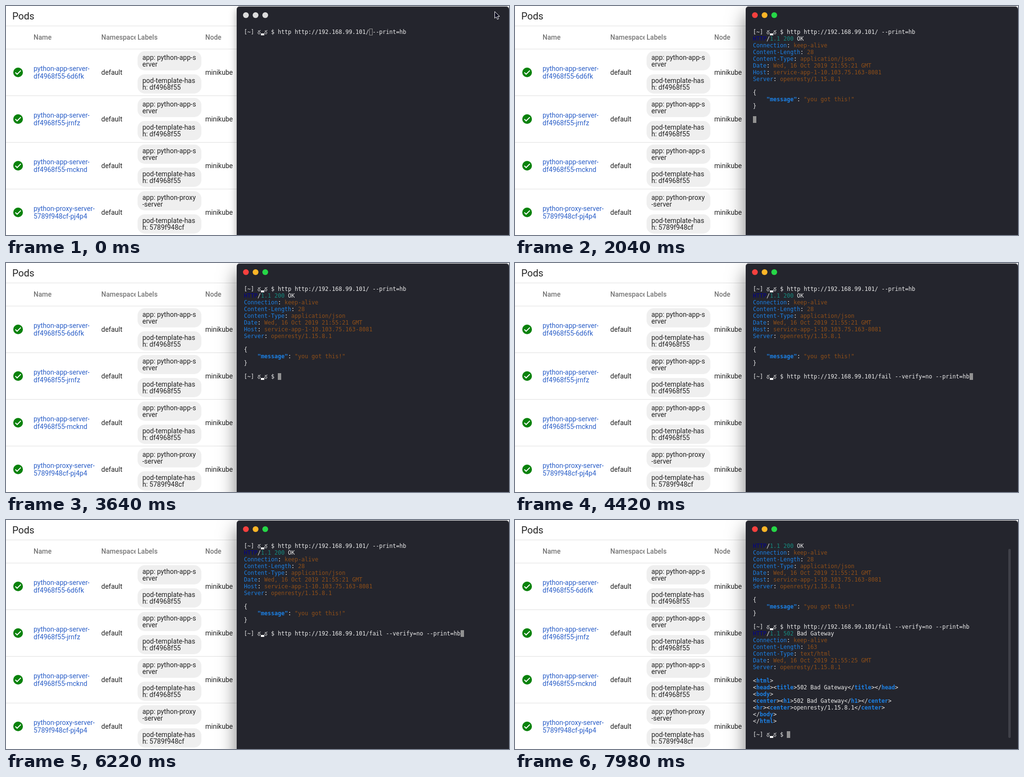
Write an HTML page that moves like this. It is 1040 px wide and 476 px high and loops after 8000 ms.

```html
<!DOCTYPE html>
<html lang="en">
<head>
<meta charset="utf-8">
<title>Pods and terminal</title>
<style>
  html, body { margin: 0; width: 100%; height: 100%; overflow: hidden; background: #fff; }
  #stage { position: relative; width: 1040px; height: 476px; overflow: hidden;
    font: 14px/16px Roboto, sans-serif; color: #212121; }
  #stage div, #stage svg.abs { position: absolute; white-space: pre; }
  .title { left: 13px; top: 9px; font-size: 20px; line-height: 24px; }
  .head { top: 57px; font-weight: 500; color: #757575; overflow: hidden; }
  .rule { left: 0; width: 480px; height: 1px; background: #e0e0e0; }
  .name { left: 57px; color: #2b5fc8; }
  .chip { left: 272px; width: 122px; height: 34px; padding: 6px 0 0 10px;
    border-radius: 15px; background: #efefef; line-height: 14px; }
  #window { left: 477px; top: 1px; width: 563px; height: 520px; border-radius: 6px; background: #24252d;
    box-shadow: 0 6px 16px rgba(0,0,0,.35), inset 0 1px #44454c; }
  #window.active { box-shadow: 0 16px 38px rgba(0,0,0,.52), inset 0 1px #44454c; }
  .light { top: 12px; width: 12px; height: 12px; border-radius: 50%; background: #dcdcdc; }
  .active .light { background: var(--on); }
  #screen { left: 15px; top: 46px; width: 540px; height: 420px; color: #ececec;
    font: 11.627px/14px "DejaVu Sans Mono", monospace; }
  #screen svg { vertical-align: top; }
  .proto { color: #00008c; }
  .num { color: #168a7e; }
  .key { color: #1c80e4; }
  .val { color: #8f4f18; }
  b { color: #1c80e4; }
  #cursor { width: 7px; height: 14px; box-sizing: border-box; background: #929292; }
  #cursor.hollow { background: none; border: 1px solid #929292; }
  #bar { left: 543px; top: 59px; width: 5px; height: 393px; border-radius: 2.5px; background: #404149; }
</style>
</head>
<body>
<div id="stage">
  <div class="title">Pods</div>
  <div class="head" style="left:57px">Name</div>
  <div class="head" style="left:197px;width:71px">Namespace</div>
  <div class="head" style="left:272px">Labels</div>
  <div class="head" style="left:412px">Node</div>
  <div class="rule" style="top:41px"></div>
  <div id="pods" style="left:0;top:0"></div>
  <div id="window">
    <div class="light" style="left:13px;--on:#f6403e"></div>
    <div class="light" style="left:33px;--on:#fdb527"></div>
    <div class="light" style="left:53px;--on:#26d747"></div>
    <div id="screen"></div>
    <div id="cursor"></div>
    <div id="bar"></div>
  </div>
  <svg id="pointer" class="abs" width="14" height="20" style="left:1009px;top:10px">
    <path d="M1.5 1.5V15.5L4.8 12.5L7 17.8L9.5 16.7L7.3 11.6H11.7Z" fill="#06061c" stroke="#fff"/>
  </svg>
</div>
<script>
const LOOP = 8000;
const FOCUS = 420, LEAVE = 1680, GONE = 1860;
const ENTER_OK = 1440, REPLY_OK = 1980, PROMPT_OK = 2160;
const RECALL = 4400, ENTER_FAIL = 6720, REPLY_FAIL = 7260;
const $ = id => document.getElementById(id);

const pods = [
  ['python-app-server-', 'df4968f55-6d6fk'],
  ['python-app-server-', 'df4968f55-jrnfz'],
  ['python-app-server-', 'df4968f55-mcknd'],
  ['python-proxy-server-', '5789f948cf-pj4p4']
];
$('pods').innerHTML = pods.map(([app, id], i) => {
  const y = 89 + 97 * i;
  const label = app.includes('proxy') ? 'app: python-proxy\n-server' : 'app: python-app-s\nerver';
  const at = (top, left) => `style="top:${y + top}px${left ? `;left:${left}px` : ''}"`;
  return `<div class="rule" ${at(0)}></div>
    <svg class="abs" width="24" height="24" ${at(37, 13)}>
      <circle cx="12" cy="12" r="10" fill="#0a820c"/>
      <path d="M6.3 12.1L10 15.8L17.7 8.1" fill="none" stroke="#fff" stroke-width="2"/></svg>
    <div class="name" ${at(33)}>${app}\n${id}</div>
    <div ${at(41, 197)}>default</div>
    <div class="chip" ${at(5)}>${label}</div>
    <div class="chip" ${at(53)}>pod-template-has\nh: ${id.split('-')[0]}</div>
    <div ${at(41, 412)}>minikube</div>`;
}).join('');

const paint = (cls, text) => `<span class="${cls}">${text}</span>`;
const status = (code, text) => `${paint('proto', 'HTTP')}/${paint('num', '1.1 ' + code)} ${text}`;
const header = line => line.replace(/^([^:]+): (.*)$/, (_, k, v) => `${paint('key', k)}: ${paint('val', v)}`);
const markup = line => line.replace(/<(\/?)(\w+)>/g, '&lt;$1<b>$2</b>&gt;');

const eye = x => `<path d="M${x + 1} 4.5Q${x + 3} 6 ${x + 6.5} 3.5M${x + 3.5} 6.2
  C${x} 6.2 ${x} 11.3 ${x + 3.2} 11.3S${x + 6.3} 6.2 ${x + 3.5} 6.2M${x + 3} 8.7h1"/>`;
const prompt = `[~] <svg width="21" height="14" fill="none" stroke="#ececec">${eye(0)}${eye(14)}
  <path d="M7 12h7" stroke="#fff" stroke-width="4"/></svg> $ `;
const PROMPT_COLS = 10;

const callOk = 'http http://192.168.99.101/ --print=hb';
const callFail = 'http http://192.168.99.101/fail --verify=no --print=hb';
const replyOk = [
  status(200, 'OK'),
  ...['Connection: keep-alive', 'Content-Length: 28', 'Content-Type: application/json',
    'Date: Wed, 16 Oct 2019 21:55:21 GMT', 'Host: service-app-1-10.103.75.163-8081',
    'Server: openresty/1.15.8.1'].map(header),
  '', '{', `    <b>"message"</b>: ${paint('val', '"you got this!"')}`, '}', ''
];
const replyFail = [
  status(502, 'Bad Gateway'),
  ...['Connection: keep-alive', 'Content-Length: 163', 'Content-Type: text/html',
    'Date: Wed, 16 Oct 2019 21:55:25 GMT', 'Server: openresty/1.15.8.1'].map(header),
  '',
  ...['<html>', '<head><title>502 Bad Gateway</title></head>', '<body>',
    '<center><h1>502 Bad Gateway</h1></center>', '<hr><center>openresty/1.15.8.1</center>',
    '</body>', '</html>'].map(markup),
  ''
];

// Terminal lines and cursor column at time t; the cursor is always on the last line.
function terminal(t) {
  const lines = [prompt + callOk];
  if (t < ENTER_OK) return { lines, col: 37 };
  if (t >= REPLY_OK) lines.push(...replyOk);
  if (t < PROMPT_OK) return { lines: [...lines, ''], col: 0 };
  if (t < RECALL) return { lines: [...lines, prompt], col: PROMPT_COLS };
  lines.push(prompt + callFail);
  if (t < ENTER_FAIL) return { lines, col: PROMPT_COLS + callFail.length };
  if (t < REPLY_FAIL) return { lines: [...lines, ''], col: 0 };
  return { lines: [...lines, ...replyFail, prompt].slice(1), col: PROMPT_COLS };
}

let shown = '';
function draw(t) {
  const { lines, col } = terminal(t);
  const html = lines.join('\n');
  if (html !== shown) $('screen').innerHTML = shown = html;
  $('cursor').style.left = 15 + 7 * col + 'px';
  $('cursor').style.top = 46 + 14 * (lines.length - 1) + 'px';
  $('cursor').className = t < FOCUS ? 'hollow' : '';
  $('window').className = t < FOCUS ? '' : 'active';
  $('bar').style.display = t < REPLY_FAIL ? 'none' : '';
  const p = Math.min(1, Math.max(0, (t - LEAVE) / (GONE - LEAVE)));
  $('pointer').style.transform = `translate(${32 * p * p}px, ${-9 * p * p}px)`;
}

const start = performance.now();
function tick() {
  draw((performance.now() - start) % LOOP);
  requestAnimationFrame(tick);
}
tick();
</script>
</body>
</html>
```
